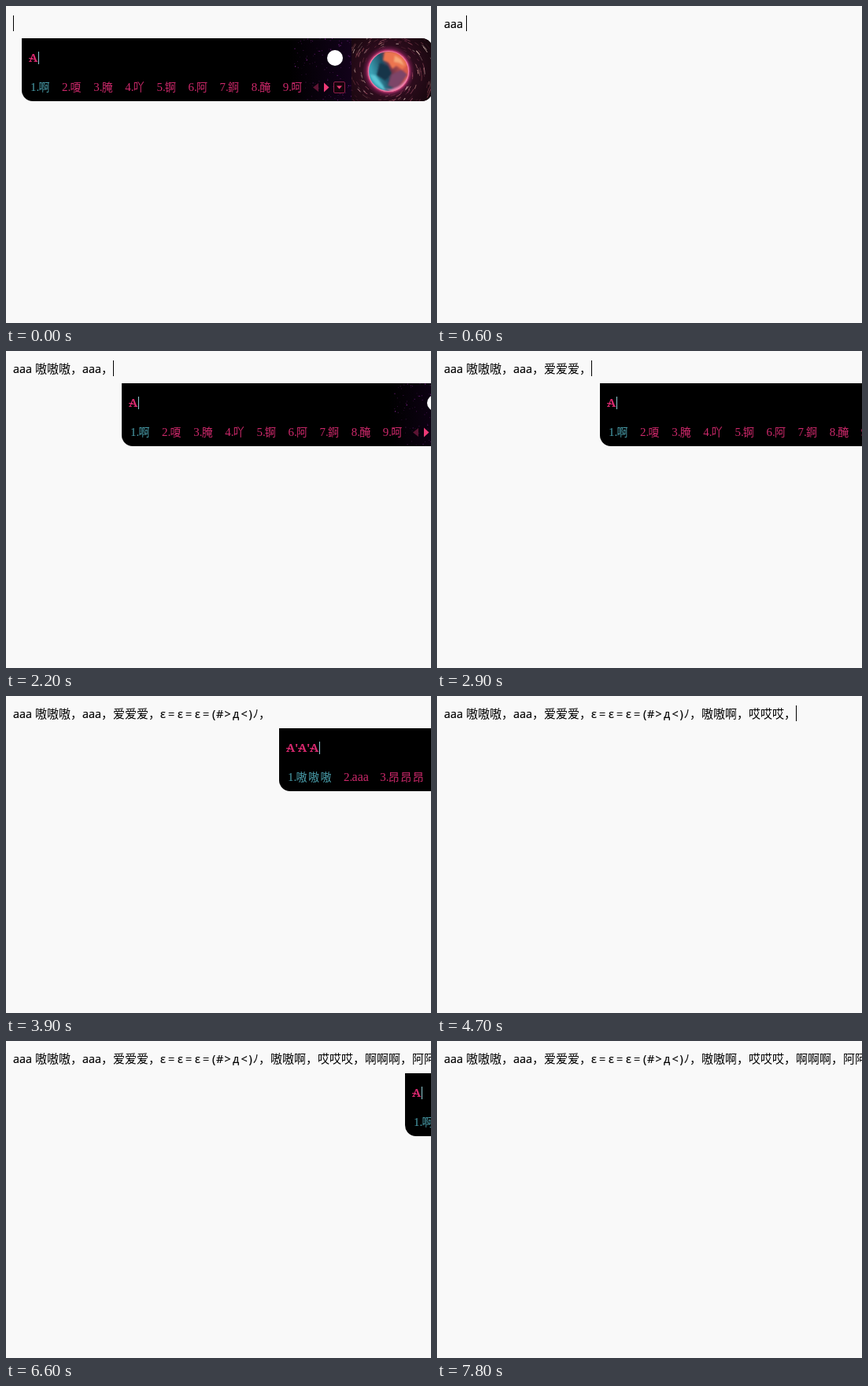
Animation of 540x403 px, one loop 8000 ms. Source, as an HTML page:

```html
<!DOCTYPE html>
<html lang="zh-CN">
<head>
<meta charset="utf-8">
<title>Input method typing</title>
<style>
  html, body { margin: 0; width: 100%; height: 100%; overflow: hidden; background: #f9f9f9; }
  svg { display: block; width: 540px; height: 403px; }
  text { white-space: pre; }
  #line { font: 500 15px "Noto Sans CJK SC", "Noto Sans CJK JP", sans-serif; fill: #000; }
  #line .latin { font: 14.4px "Open Sans", "Noto Sans", sans-serif; stroke: #000; stroke-width: .2; }
  #comp { font: bold 15px "Noto Serif", "Liberation Serif", serif; fill: #d8286e; }
  #cands { font: 300 14px "Noto Sans CJK SC", "Noto Sans CJK JP", sans-serif; fill: #cc286a; }
  #cands .num { font: 15px "Liberation Serif", serif; }
  #cands .latin { font: 16px "Liberation Serif", serif; }
  #cands .on { fill: #4a9fac; }
</style>
</head>
<body>
<svg viewBox="0 0 540 403" xmlns="http://www.w3.org/2000/svg">
  <defs>
    <clipPath id="shape"><path d="M0 0H508A14 14 0 0 1 522 14V66A14 14 0 0 1 508 80H14A14 14 0 0 1 0 66Z"/></clipPath>
    <clipPath id="scene"><rect x="419" width="103" height="80"/></clipPath>
    <clipPath id="disc"><circle cx="466" cy="42" r="26"/></clipPath>
    <radialGradient id="haze" gradientUnits="userSpaceOnUse" cx="466" cy="42" r="72">
      <stop offset=".36" stop-color="#7c1f52"/>
      <stop offset=".46" stop-color="#2c0c1c"/>
      <stop offset="1" stop-color="#100509"/>
    </radialGradient>
    <linearGradient id="purple">
      <stop offset="0" stop-color="#12021a" stop-opacity="0"/>
      <stop offset="1" stop-color="#12021a"/>
    </linearGradient>
    <linearGradient id="globe" x1=".1" y1=".55" x2=".85" y2=".3">
      <stop offset="0" stop-color="#3aa0b4"/>
      <stop offset=".4" stop-color="#1f5066"/>
      <stop offset=".6" stop-color="#74354a"/>
      <stop offset="1" stop-color="#d85a4a"/>
    </linearGradient>
    <filter id="soft"><feGaussianBlur stdDeviation="1.3"/></filter>
  </defs>

  <g id="line"></g>
  <rect id="caret" width="1" height="20"/>

  <g id="panel">
    <g clip-path="url(#shape)">
      <rect width="522" height="80"/>
      <rect x="340" width="79" height="80" fill="url(#purple)"/>
      <g id="stars"></g>
      <g clip-path="url(#scene)">
        <rect x="419" width="103" height="80" fill="url(#haze)"/>
        <g id="swirl" fill="none"></g>
        <circle cx="466" cy="42" r="27" fill="#e0457c" filter="url(#soft)"/>
        <g clip-path="url(#disc)">
          <circle cx="466" cy="42" r="26" fill="url(#globe)"/>
          <g filter="url(#soft)">
            <path d="M461 17q20-2 29 16l-6 7-8-5-5 4-5-8-7-3z" fill="#ec7450"/>
            <path d="M474 22l8 5 4 8-7-4-6-1z" fill="#f6a878"/>
            <path d="M455 31l10 4 5 10-8 9-11-7z" fill="#173648"/>
            <path d="M470 46l12-6 8 6-14 18-11-4z" fill="#7d4468"/>
            <path d="M442 46q6 14 20 21l-3-7-10-13z" fill="#5cc6d6"/>
            <path d="M460 64q18 4 30-14l2 6-16 14z" fill="#e58ab4"/>
          </g>
        </g>
        <circle cx="466" cy="42" r="25.5" fill="none" stroke="#f07aa4" stroke-width="1.2"/>
      </g>
    </g>
    <circle cx="398" cy="25" r="10" fill="#fff"/>
    <path d="M377 57v11l-7-5.5z" fill="#5c1433"/>
    <path d="M384 56.5v12l6.5-6z" fill="#ee3a76"/>
    <rect x="396.5" y="55.5" width="14" height="14" rx="1.5" fill="#16040c" stroke="#8c1d49"/>
    <path d="M400 60.5h7l-3.5 4z" fill="#ee3a76"/>
    <g id="comp"></g>
    <g id="cands"></g>
    <rect id="mark" y="17" width="1" height="16" fill="#8fc9d2"/>
  </g>
</svg>
<script>
const LOOP = 8000, BLINK = 500;
const $ = id => document.getElementById(id);
const label = (x, y, s, cls = '') => `<text x="${x}" y="${y}" class="${cls}">${s}</text>`;

const face = [
  ...[196, 218, 240].flatMap(x => [[x, 'ε', 'latin'], [x + 10, '=', 'latin']]),
  ...[[262, '('], [267, '#'], [277.5, '&gt;'], [288, 'д'], [298.5, '&lt;'], [308.5, ')']]
    .map(([x, s]) => [x, s, 'latin'])
];

// time, caret x, pieces added as [x, text, class]
const commits = [
  [0, 9, []],
  [500, 33, [[9, 'aaa', 'latin']]],
  [600, 37, []],
  [1300, 97, [[37, '嗷嗷嗷，']]],
  [2000, 136, [[97, 'aaa', 'latin'], [121, '，']]],
  [2700, 196, [[136, '爱爱爱，']]],
  [3400, 336, [...face, [313.5, 'ﾉ'], [321, '，']]],
  [4100, 396, [[336, '嗷嗷啊，']]],
  [4700, 456, [[396, '哎哎哎，']]],
  [5400, 516, [[456, '啊啊啊，']]],
  [6100, 576, [[516, '阿阿阿，']]]
];

const lists = [
  [],
  [...'啊嗄腌吖锕阿錒醃呵'],
  ['嗷嗷', '昂昂', '爱爱', '啊啊', 'aa'],
  ['嗷嗷嗷', 'aaa', '昂昂昂', '爱爱爱'],
  ['嗷嗷啊', '哎哎哎', '啊啊啊', '阿阿阿']
];

// time, letters typed (0 hides the panel), selected item, list
const keys = [
  [0, 1], [100, 2], [200, 3], [400, 3, 1], [500, 0],
  [800, 1], [900, 2], [1000, 3], [1300, 0],
  [1500, 1], [1600, 2], [1700, 3], [1800, 3, 1], [2000, 0],
  [2200, 1], [2300, 2], [2500, 3], [2600, 3, 3], [2700, 0],
  [2900, 1], [3000, 2], [3200, 3], [3300, 3, 0, 4], [3400, 0],
  [3600, 1], [3700, 2], [3900, 3], [4000, 3, 0, 4], [4100, 0],
  [4300, 1], [4400, 2], [4600, 3], [4700, 0],
  [5000, 1], [5100, 2], [5200, 3], [5400, 0],
  [5600, 1], [5900, 3], [6100, 0],
  [6600, 1], [6800, 0]
];

let seed = 11;
const rnd = () => (seed = seed * 16807 % 2147483647) / 2147483647;

function decorate() {
  let stars = '', swirl = '';
  for (let i = 0; i < 130; i++) {
    const x = 419 - 74 * rnd() ** 1.6, y = 80 * rnd() ** 1.3;
    const size = .5 + rnd() * .8;
    stars += `<rect x="${x}" y="${y}" width="${size}" height="${size}" fill="#a02fb4" opacity="${.2 + rnd() * .6}"/>`;
  }
  const tones = ['#e09a94', '#8e4350', '#f6d8cc', '#7c3150', '#c0647a'];
  for (let i = 0; i < 300; i++) {
    const r = 29 + rnd() * 45, a = rnd() * 6.283, b = a + .06 + rnd() * .14;
    const at = (q, k) => `${466 + k * Math.cos(q)} ${42 + k * Math.sin(q)}`;
    swirl += `<path d="M${at(a, r)}A${r} ${r} 0 0 1 ${at(b, r + 1)}" stroke="${tones[i % 5]}" stroke-width="${.5 + rnd() * .6}" opacity="${.3 + rnd() * .6}"/>`;
  }
  $('stars').innerHTML = stars;
  $('swirl').innerHTML = swirl;
}

function drawComp(n) {
  let out = '';
  for (let i = 0; i < n; i++) {
    const x = 9 + 15 * i;
    out += label(x, 30, 'A') + `<rect x="${x}" y="25" width="5" height="1"/>`;
    if (i < n - 1) out += label(x + 11, 30, "'");
  }
  $('comp').innerHTML = out;
  $('mark').setAttribute('x', 6 + 15 * n);
}

function drawCands(items, sel) {
  let x = 11, out = '';
  items.forEach((s, i) => {
    const latin = /^a/.test(s), on = i === sel ? ' on' : '';
    const glyphs = latin ? [s] : [...s];
    out += label(x, 67, i + 1 + '.', 'num' + on);
    x += 10.5;
    for (const g of glyphs) {
      out += label(x, 67, g, (latin ? 'latin' : '') + on);
      x += latin ? 21.5 : 15.5;
    }
    x += 14.1;
  });
  $('cands').innerHTML = out;
}

const latest = (list, t) => list.findLastIndex(e => e[0] <= t);
let shownText = -1, shownKey = -1;

function frame() {
  const t = performance.now() % LOOP;
  const c = latest(commits, t), k = latest(keys, t);
  const [since, x] = commits[c];

  if (c !== shownText) {
    shownText = c;
    $('line').innerHTML = commits.slice(0, c + 1).flatMap(e => e[2])
      .map(([px, s, cls]) => label(px, 28, s, cls)).join('');
  }
  if (k !== shownKey) {
    shownKey = k;
    const [, n, sel = 0, list = n] = keys[k];
    $('panel').style.display = n ? '' : 'none';
    drawComp(n);
    drawCands(lists[list], sel);
  }
  $('panel').setAttribute('transform', `translate(${t >= 5900 ? 507 : x + 11} 41)`);

  const newLine = t >= 7300;
  const lit = newLine ? t < 7800 : t - since < (c ? BLINK : 300);
  $('caret').setAttribute('x', newLine ? 9 : x);
  $('caret').setAttribute('y', newLine ? 52 : 12);
  $('caret').style.display = lit ? '' : 'none';
  requestAnimationFrame(frame);
}

decorate();
frame();
</script>
</body>
</html>
```
